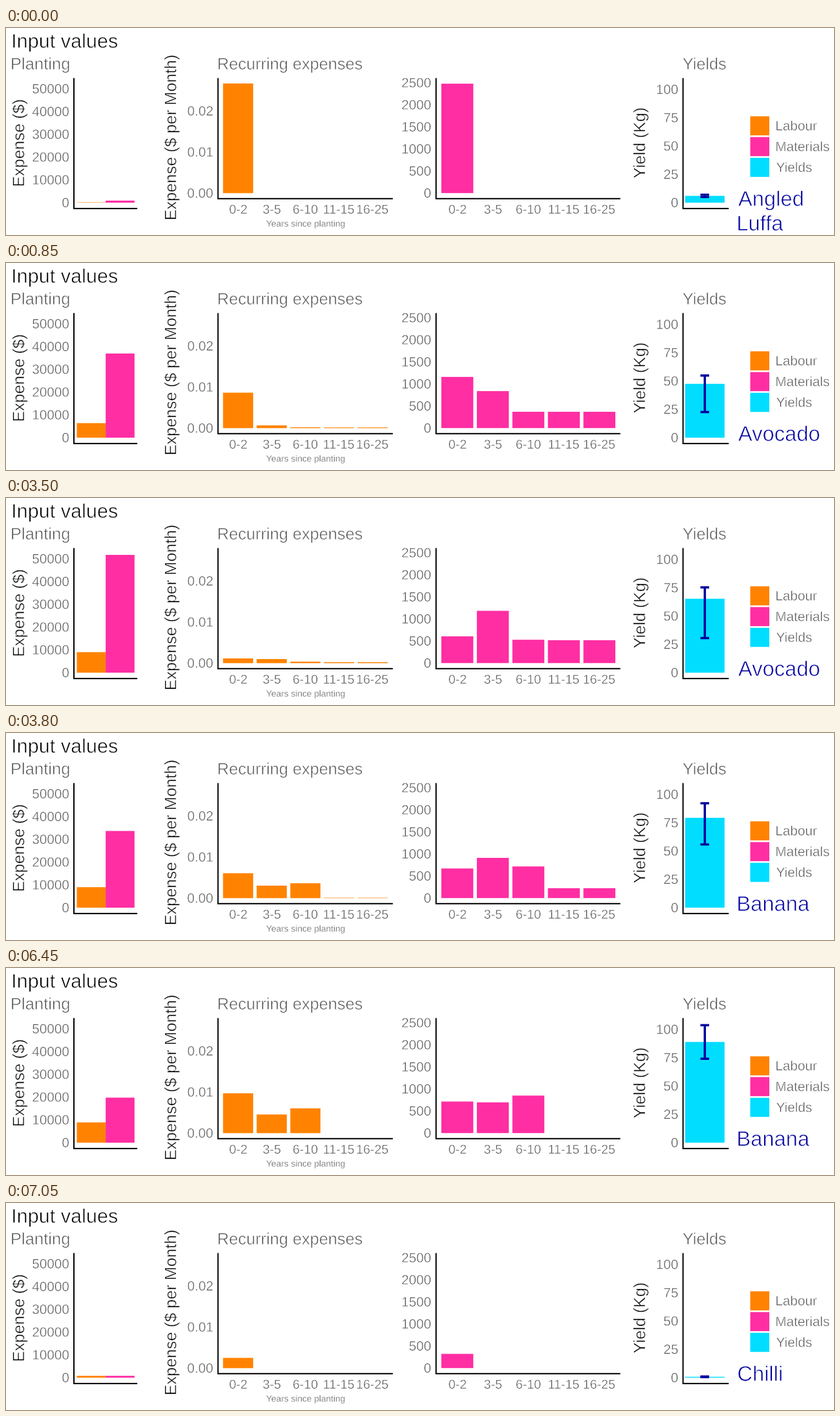
Animation of 1280x320 px, one loop 8 s. Source, as a matplotlib script:

```python
import numpy as np
import matplotlib.pyplot as plt
from matplotlib.animation import FuncAnimation
from matplotlib.patches import PathPatch, Rectangle
from matplotlib.textpath import TextPath
from matplotlib.transforms import Affine2D

WIDTH, HEIGHT, DPI = 1280, 320, 100
LOOP_MS, STEP_MS = 8000, 50
TWEEN_STEPS = 13
TWEEN_STARTS = [500, 3500, 6450]

ORANGE, PINK, CYAN, NAVY = "#ff8300", "#ff2ea3", "#00ddff", "#0000a0"
GREY = "#555555"
THINNING = .025  # share of the font size trimmed from each letter stroke
AGES = ["0-2", "3-5", "6-10", "11-15", "16-25"]

# Per crop: planting (labour, materials), recurring labour by age,
# recurring materials by age, then yield with its low and high limits.
CROPS = [
    ("Angled\nLuffa", [150, 900], [.0267, 0, 0, 0, 0],
     [2480, 0, 0, 0, 0], [6, 5, 7]),
    ("Avocado", [9000, 52100], [.00105, .00095, .0003, .00025, .00025],
     [605, 1190, 525, 525, 525], [65, 30, 75]),
    ("Banana", [9000, 20000], [.0098, .0046, .0061, 0, 0],
     [720, 705, 860, 0, 0], [90, 75, 105]),
    ("Chilli", [800, 800], [.0025, 0, 0, 0, 0],
     [322, 0, 0, 0, 0], [.75, .5, 1]),
]
VALUES = [np.concatenate(crop[1:]) for crop in CROPS]

plt.rcParams["font.family"] = "Liberation Sans"
fig = plt.figure(figsize=(WIDTH / DPI, HEIGHT / DPI), dpi=DPI, facecolor="white")
ax = fig.add_axes([0, 0, 1, 1])
ax.set_xlim(0, WIDTH)
ax.set_ylim(HEIGHT, 0)
ax.axis("off")


def points(px):
    return px * 72 / DPI


def label(x, y, text, px, color="black", align=0, rotation=0):
    """Draw light text; align is 0 for left, .5 for centre, 1 for right."""
    path = TextPath((0, 0), text, size=px)
    box = path.get_extents()
    place = (Affine2D().translate(-box.x0 - align * box.width, 0)
             .scale(1, -1).rotate_deg(-rotation).translate(x, y))
    return ax.add_patch(PathPatch(path.transformed(place), fc=color, ec="white",
                                  lw=points(THINNING * px), joinstyle="round"))


def axis_title(x, y, text):
    label(x, y, text, 25.2, align=.5, rotation=90)


def stroke(xs, ys, px, color):
    return ax.plot(xs, ys, color=color, lw=points(px), snap=False,
                   solid_capstyle="butt", solid_joinstyle="miter")[0]


def block(x, y, width, height, color):
    patch = Rectangle((x, y), width, height, fc=color, lw=0, snap=False)
    return ax.add_patch(patch)


class Panel:
    """Bar chart whose values map to pixels above a zero line."""

    def __init__(self, left, right, bottom, zero, scale, ticks, fmt, tick_right):
        self.zero, self.scale, self.bars = zero, scale, []
        stroke([left, left, right], [77.4, bottom, bottom], 2, "black")
        for tick in ticks:
            label(tick_right, self.y(tick) + 7, format(tick, fmt), 20.7,
                  GREY, align=1)

    def y(self, value):
        return self.zero - value * self.scale

    def add_bars(self, first, pitch, width, colors):
        self.bars = [block(first + i * pitch, self.zero, width, 0, color)
                     for i, color in enumerate(colors)]

    def label_ages(self, first, pitch):
        for i, age in enumerate(AGES):
            label(first + i * pitch, 287, age, 19.6, GREY, align=.5)

    def update(self, values):
        for bar, value in zip(self.bars, values):
            bar.set_y(self.y(value))
            bar.set_height(value * self.scale)


label(11, 30.5, "Input values", 30.6)
label(9, 64, "Planting", 25.6, GREY)
label(328.5, 64, "Recurring expenses", 25.3, GREY)
label(1046.5, 64, "Yields", 25.2, GREY)
axis_title(28, 177.5, "Expense ($)")
axis_title(263, 169, "Expense ($ per Month)")
axis_title(988, 178, "Yield (Kg)")
label(463, 307, "Years since planting", 13.7, GREY, align=.5)

planting = Panel(105, 203, 279.1, 270, 35.2 / 10000,
                 range(0, 50001, 10000), "d", 97)
planting.add_bars(109.5, 44.6, 44.6, [ORANGE, PINK])

labour = Panel(327.7, 598, 263.8, 255.3, 6350, [0, .01, .02], ".2f", 319.5)
labour.add_bars(335.5, 52, 46.6, [ORANGE] * 5)
labour.label_ages(359, 51.9)

materials = Panel(664.8, 949.7, 263.8, 255.2, 34.1 / 500,
                  range(0, 2501, 500), "d", 656.5)
materials.add_bars(673, 54.9, 49.4, [PINK] * 5)
materials.label_ages(698, 54.8)

yields = Panel(1046.6, 1117.3, 279.1, 270, 1.75, range(0, 101, 25), "d", 1038.5)
yields.add_bars(1050, 0, 60.8, [CYAN])

for i, (name, color) in enumerate(
        [("Labour", ORANGE), ("Materials", PINK), ("Yields", CYAN)]):
    top = 136.5 + 32.1 * i
    block(1150.5, top, 29.5, 29.5, color)
    label(1191, top + 21.7, name, 20.7, GREY)

stem = stroke([1080.3, 1080.3], [0, 0], 3.5, NAVY)
caps = [stroke([1073.5, 1087], [0, 0], 3.5, NAVY) for _ in range(2)]
crop_labels = {
    name: [label(1132, 275 + 38 * i, line, 32.7, NAVY)
           for i, line in enumerate(name.split("\n"))]
    for name, *_ in CROPS
}


def quad_in_out(t):
    return 2 * t * t if t < .5 else 1 - 2 * (1 - t) ** 2


def state_at(ms):
    """Return the current crop name and its interpolated values."""
    name, values = CROPS[0][0], VALUES[0]
    for i, start in enumerate(TWEEN_STARTS):
        if ms < start:
            break
        t = min(1, ((ms - start) / STEP_MS + 1) / TWEEN_STEPS)
        values = VALUES[i] + (VALUES[i + 1] - VALUES[i]) * quad_in_out(t)
        name = CROPS[i + (t >= .5)][0]
    return name, values


def draw(frame):
    current, values = state_at(frame * STEP_MS)
    planting.update(values[:2])
    labour.update(values[2:7])
    materials.update(values[7:12])
    yields.update(values[12:13])

    limits = [yields.y(v) for v in values[13:]]
    stem.set_ydata(limits)
    for cap, y in zip(caps, limits):
        cap.set_ydata([y, y])

    for name, lines in crop_labels.items():
        for line in lines:
            line.set_visible(name == current)
    return []


animation = FuncAnimation(fig, draw, frames=LOOP_MS // STEP_MS,
                          interval=STEP_MS, repeat=True, repeat_delay=0)
plt.show()
```
